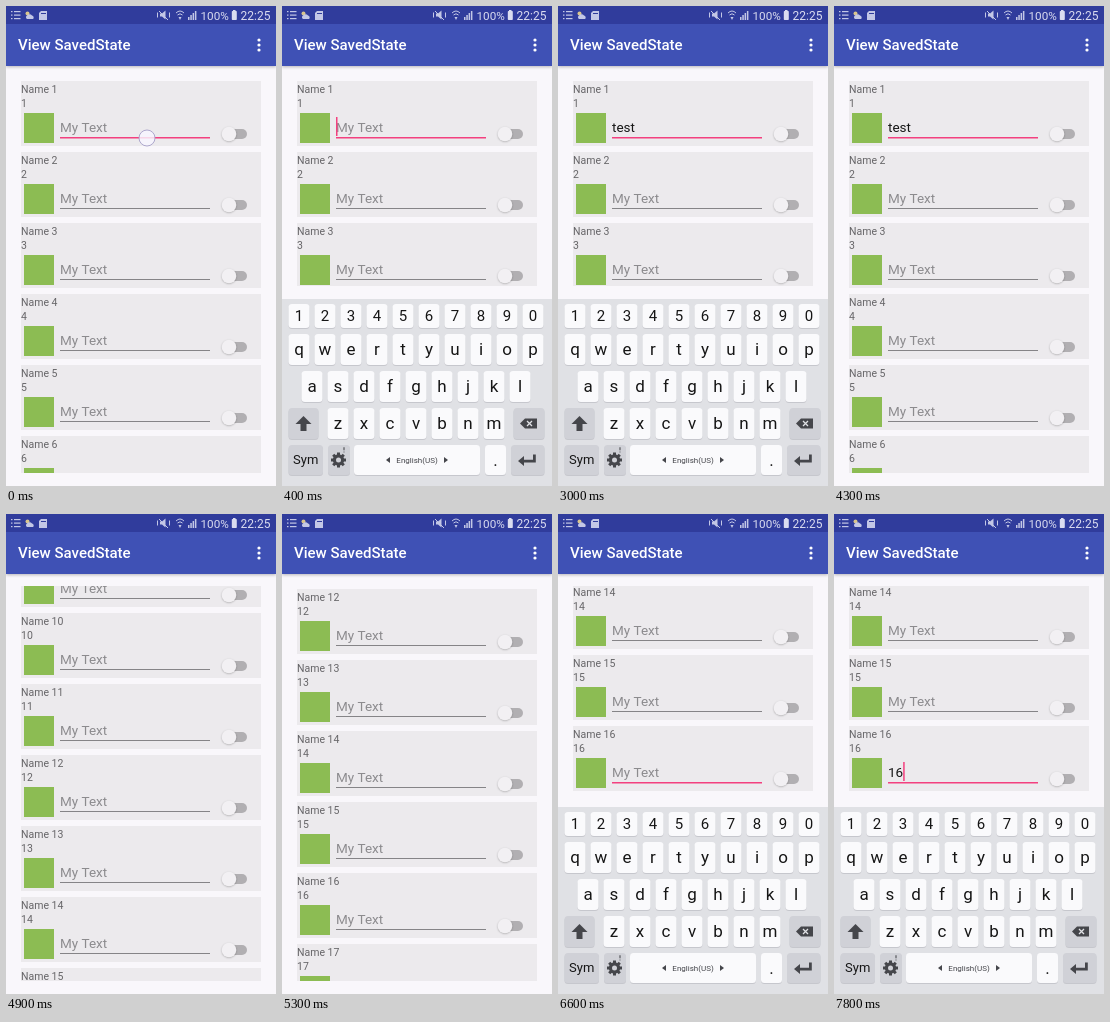
Animation, 270 px wide and 480 px high, one loop 8000 ms. Source, as an HTML page with a canvas:

```html
<!DOCTYPE html>
<html lang="en">
<head>
<meta charset="utf-8">
<title>View SavedState</title>
<style>
html, body { margin: 0; width: 100%; height: 100%; overflow: hidden; background: #f9f7fb }
canvas { display: block; width: 270px; height: 480px }
</style>
</head>
<body>
<canvas id="stage"></canvas>
<script>
const LOOP = 8000, PITCH = 71, LIST_TOP = 72, LIST_END = 468.5, KEYS_TOP = 293;
const PINK = '#f3407f', GREY = '#666568', INK = '#161616', STATUS = '#c3c7e6';
const canvas = document.getElementById('stage'), c = canvas.getContext('2d');
const dpr = window.devicePixelRatio || 1;
canvas.width = 270 * dpr;
canvas.height = 480 * dpr;
c.scale(dpr, dpr);

// Touches: start, end, x, y and, for a drag, the last y
const touches = [
  [0, 90, 141, 132],
  [1200, 1380, 119, 346], [1400, 1580, 70, 346], [1700, 1790, 45, 388], [2500, 2690, 118, 345],
  [4420, 4700, 140, 400, 150],
  [6000, 6190, 135, 404],
  [7100, 7290, 18, 316], [7500, 7690, 147, 318]
];
// Typing: time, row, text; an empty text marks the moment of focus
const typing = [
  [390, 1, ''], [1200, 1, 't'], [1400, 1, 'te'], [1700, 1, 'tes'], [2500, 1, 'test'],
  [6100, 16, ''], [7100, 16, '1'], [7500, 16, '16']
];

const part = (t, a, b) => Math.min(1, Math.max(0, (t - a) / (b - a)));
const easeOut = (u, n = 2) => 1 - (1 - u) ** n;
const smooth = u => u * u * (3 - 2 * u);

function rect(x, y, w, h, color) {
  c.fillStyle = color;
  c.fillRect(x, y, w, h);
}
function round(x, y, w, h, r, color) {
  c.fillStyle = color;
  c.beginPath();
  c.roundRect(x, y, w, h, r);
  c.fill();
}
function dot(x, y, r, color) {
  c.fillStyle = color;
  c.beginPath();
  c.arc(x, y, r, 0, 7);
  c.fill();
}
function text(s, x, y, size, color, align = 'left', weight = 400) {
  c.font = `${weight} ${size}px Roboto, sans-serif`;
  c.textAlign = align;
  c.fillStyle = color;
  c.fillText(s, x, y);
}
function shape(d, color) {
  c.fillStyle = color;
  c.fill(new Path2D(d));
}
function stroke(d, color, width = 1) {
  c.strokeStyle = color;
  c.lineWidth = width;
  c.stroke(new Path2D(d));
}
function shadow(blur, dy, color) {
  c.shadowBlur = blur * dpr;
  c.shadowOffsetY = dy * dpr;
  c.shadowColor = color;
}

function scrollAt(t) {
  const drag = 250 * part(t, 4420, 4700) ** 2;
  const fling = 533 * easeOut(part(t, 4700, 5500), 4);
  return Math.round(drag + fling + 145 * smooth(part(t, 6250, 6560)));
}

function drawRow(n, y, t) {
  rect(15, y, 240, 65, '#eceaed');
  text('Name ' + n, 15, y + 12, 10.5, GREY);
  text(n, 15, y + 26, 10.5, GREY);
  rect(18, y + 32, 30, 30, '#8cbc53');

  const last = typing.filter(e => e[1] === n && t >= e[0]).pop();
  const value = last ? last[2] : '';
  const focused = n === 1 ? t < 5900 : n === 16 && t >= 6050;
  text(value || 'My Text', 54, y + 51, 13.5, value ? INK : '#8c8b8e');
  if (focused) rect(54, y + 56, 150, 1.5, PINK);
  else rect(54, y + 56, 150, 1, '#858487');

  const lit = last && Math.floor((t - last[0]) / 500) % 2 === 0;
  if (focused && lit && !(n === 1 && t >= 4000))
    rect(54 + c.measureText(value).width, y + 36, 1.5, 19, PINK);

  round(219, y + 48, 22, 10, 5, '#b1afb2');
  shadow(2, .7, '#0004');
  dot(223, y + 53, 7.3, '#f2f0f3');
  shadow(0, 0, 'transparent');
}

function drawList(t, keysY) {
  const scroll = scrollAt(t), first = Math.floor(scroll / PITCH);
  c.save();
  c.beginPath();
  c.rect(0, LIST_TOP, 270, Math.min(LIST_END, keysY - 13) - LIST_TOP);
  c.clip();
  for (let i = first; i < first + 7; i++) drawRow(i + 1, LIST_TOP + 3 + i * PITCH - scroll, t);
  c.restore();
}

function drawStatus() {
  rect(0, 0, 270, 18, '#303c9c');
  for (const y of [5, 8.5, 12]) {
    rect(5, y, 1.5, 1.2, STATUS);
    rect(8, y, 6.5, 1.2, STATUS);
  }
  dot(21.5, 7.5, 2, '#d9c58c');
  shape('M21 13a2 2 0 0 1 0-3.5a3 3 0 0 1 5 0a2 2 0 0 1 1 3.5z', STATUS);
  shape('M35 5h6v9h-8v-7z', STATUS);
  rect(35, 7, 5, 1, '#303c9c');

  stroke('M151.5 6.5v5M163.5 6.5v5M153 5l9 9', STATUS);
  shape('M154 7.5h2l3.5-3v9l-3.5-3h-2z', STATUS);
  stroke('M170 7q4-4 8 0M171.5 9q2.5-2.5 5 0', STATUS);
  shape('M172.5 11h3l-1.5 3z', STATUS);
  for (let i = 0; i < 4; i++) rect(182 + 2.3 * i, 11 - 2 * i, 1.5, 3 + 2 * i, STATUS);
  text('100%', 194.5, 13.5, 11.7, '#dadcf0');
  rect(227, 4, 2.5, 1.5, '#dadcf0');
  round(225.8, 5, 5, 9, .7, '#dadcf0');
  text('22:25', 234.5, 13.5, 12, '#dadcf0');
}

function drawBar() {
  shadow(3, 1, '#0004');
  rect(0, 18, 270, 42, '#3f51b5');
  shadow(0, 0, 'transparent');
  text('View SavedState', 12, 44, 15, '#fff', 'left', 500);
  for (const y of [34, 39, 44]) dot(253, y, 1.6, '#fff');
  drawStatus();
}

function key(x, y, w, h, label, size = 17, color = '#fafafc') {
  round(x, y + 1, w, h, 3.5, '#c6c7cd');
  round(x, y, w, h, 3.5, color);
  if (label) text(label, x + w / 2, y + h / 2 + size * .33, size, INK, 'center');
}

function drawKeys(top) {
  const dark = '#d0d1d7', icon = '#45464b';
  c.save();
  c.translate(0, top - KEYS_TOP);
  rect(0, KEYS_TOP, 270, 187, '#e0e1e5');
  const rows = [['1234567890', 17, 298, 24, 15], ['qwertyuiop', 17, 328, 31, 17],
    ['asdfghjkl', 30, 365, 31, 17], ['zxcvbnm', 56, 402, 31, 17]];
  for (const [chars, x, y, h, size] of rows)
    [...chars].forEach((ch, i) => key(x + 26 * i - 10.5, y, 21, h, ch, size));

  key(6.5, 402, 30, 31, '', 0, dark);
  shape('M21.5 410l8 8h-5v7h-6v-7h-5z', icon);
  key(231.5, 402, 31, 31, '', 0, dark);
  shape('M238 417.5l5-5h12v10h-12z', icon);
  stroke('M245 415l5 5M250 415l-5 5', '#e0e1e5', 1.3);

  key(6.5, 439, 34.5, 30, 'Sym', 13, dark);
  key(46, 439, 22, 30, '', 0, dark);
  c.save();
  c.translate(56.5, 454);
  for (let i = 0; i < 8; i++) {
    rect(-1.5, -7.5, 3, 4, icon);
    c.rotate(Math.PI / 4);
  }
  c.restore();
  dot(56.5, 454, 5.7, icon);
  dot(56.5, 454, 2.5, dark);
  round(61, 441, 2, 3.5, 1, '#86878c');
  rect(61.6, 445, .8, 2, '#86878c');

  key(72, 439, 126, 30);
  text('English(US)', 135, 457, 8, icon, 'center');
  shape('M108 451v6l-4-3z', icon);
  shape('M162 451v6l4-3z', icon);
  key(203, 439, 21, 30, '.');
  key(229, 439, 33.5, 30, '', 0, dark);
  shape('M236 455l6-5v3.7h9v-5.2h2.8v8h-11.8v3.5z', icon);
  c.restore();
}

function drawTouch(t) {
  for (const [from, to, x, y, endY = y] of touches) {
    if (t < from || t >= to) continue;
    const u = part(t, from, to);
    c.globalAlpha = u < .6 ? 1 : 1.6 - u;
    dot(x, y + (endY - y) * u * u, 8, '#f8f6ffd0');
    c.strokeStyle = '#a59fc8';
    c.lineWidth = .9;
    c.stroke();
    c.globalAlpha = 1;
  }
}

function draw(now) {
  const t = now % LOOP;
  const shown = easeOut(part(t, 90, 380)) - part(t, 3980, 4280) ** 2 + easeOut(part(t, 6180, 6500));
  const keysY = 480 - (480 - KEYS_TOP) * shown;
  rect(0, 0, 270, 480, '#f9f7fb');
  drawList(t, keysY);
  drawBar();
  if (shown > 0) drawKeys(keysY);
  drawTouch(t);
  requestAnimationFrame(draw);
}
requestAnimationFrame(draw);
</script>
</body>
</html>
```
